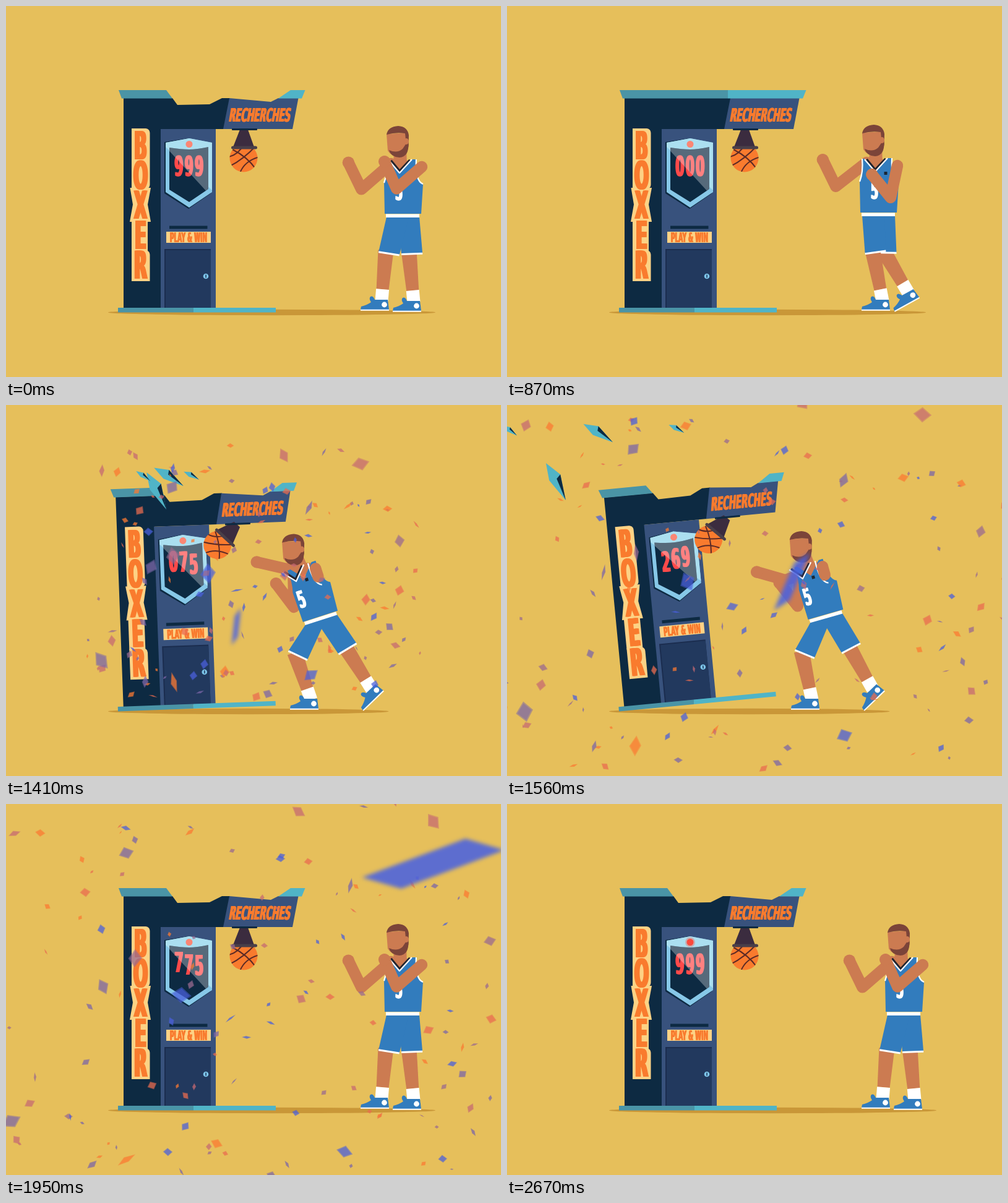
Animation of 800 by 600 pixels, one loop 2.7 s. Source, as an HTML page with a canvas:

```html
<!DOCTYPE html>
<html lang="en">
<head>
<meta charset="utf-8">
<title>Boxing machine</title>
<style>
  html, body { margin: 0; overflow: hidden; background: #e6bf5b; }
  canvas { display: block; }
</style>
</head>
<body>
<canvas id="stage" width="800" height="600"></canvas>
<script>
const ctx = document.getElementById('stage').getContext('2d');
const LOOP = 2700, HIT = 1350, COUNT_START = 1353.5, COUNT_END = 2123.5;
const SKY = '#e6bf5b', NAVY = '#0d2a42', ORANGE = '#f97b2e', CREAM = '#fdd285';
const TEAL = '#4a94a6', AQUA = '#50b4c7', PANEL = '#38527d', DOOR = '#22395e';
const SKIN = '#cc7b51', HAIR = '#7b4439', BLUE = '#327cbd', WHITE = '#fff';
const CONDENSED = .44, GROUND = 494;
const RAD = Math.PI / 180;

const clamp = v => Math.max(0, Math.min(1, v));
const span = (t, a, b) => clamp((t - a) / (b - a));
const lerp = (a, b, k) => a + (b - a) * k;
const smooth = k => k * k * (3 - 2 * k);
const arc = (t, a, b) => Math.sin(Math.PI * span(t, a, b));
const mix = (a, b, k) => a.map((v, i) => lerp(v, b[i], k));
const random = n => { const v = Math.sin(n * 127.1 + 11.7) * 43758.5453; return v - Math.floor(v); };

function turn([x, y], deg, px, py) {
  const c = Math.cos(deg * RAD), s = Math.sin(deg * RAD);
  return [x + px * c - py * s, y + px * s + py * c];
}
function poly(color, pts) {
  ctx.beginPath();
  for (let i = 0; i < pts.length; i += 2) ctx.lineTo(pts[i], pts[i + 1]);
  ctx.fillStyle = color;
  ctx.fill();
}
function rect(color, x, y, w, h, r = 0) {
  ctx.beginPath();
  ctx.roundRect(x, y, w, h, r);
  ctx.fillStyle = color;
  ctx.fill();
}
function disc(color, x, y, rx, ry = rx) {
  ctx.beginPath();
  ctx.ellipse(x, y, rx, ry, 0, 0, 7);
  ctx.fillStyle = color;
  ctx.fill();
}
function shape(color, d) {
  ctx.fillStyle = color;
  ctx.fill(new Path2D(d));
}
function line(color, width, d) {
  ctx.strokeStyle = color;
  ctx.lineWidth = width;
  ctx.stroke(new Path2D(d));
}
function placed([x, y], deg, draw) {
  ctx.save();
  ctx.translate(x, y);
  ctx.rotate(deg * RAD);
  draw();
  ctx.restore();
}
// Centred condensed lettering, thickened sideways; cap is the capital height.
function label(text, x, y, cap, color, slant = 0) {
  ctx.save();
  ctx.transform(CONDENSED, 0, -slant, 1, x, y);
  ctx.font = `bold ${cap / .729}px "DejaVu Sans", sans-serif`;
  ctx.textAlign = 'center';
  ctx.fillStyle = color;
  for (const shift of [-1, 0, 1]) ctx.fillText(text, shift * cap * .085, 0);
  ctx.restore();
}

// ---- Machine ----
function ball(swing) {
  placed([384, 200], swing, () => {
    disc(ORANGE, 0, 46, 22.5);
    ctx.save();
    ctx.beginPath();
    ctx.arc(0, 46, 22.5, 0, 7);
    ctx.clip();
    line('#5c2b26', 2, 'M-24 60 Q0 48 20 26 M-18 32 Q6 44 20 64 M-24 44 Q-8 40 0 24 M-6 70 Q2 50 26 44');
    ctx.restore();
    poly('#3b2c3f', [-6, 0, 7, 0, 17, 28, -17, 28]);
    rect('#493f49', -20, 26.5, 42, 5, 2.5);
  });
  rect(NAVY, 365, 198, 41, 3, 1);
}

function screen(t) {
  shape(NAVY, 'M256 220 L294 214 L333 221 L331 303 L295 328 L256 303 Z');
  shape('#87c8e8', 'M258 221 L296 214 L333 221 V301 L296 326 L258 301 Z');
  shape('#abdff0', 'M258 221 L296 214 L333 221 V298 L258 228 Z');
  const glass = new Path2D('M264 229 Q284 232 296 232 Q308 232 327 228 V296 L296 317 L264 297 Z');
  ctx.fillStyle = NAVY;
  ctx.fill(glass);

  const lit = t > COUNT_END && (t - 2240 + LOOP) % 195 < 100;
  if (lit) disc('rgba(255,80,60,.35)', 296, 223.5, 8);
  disc(lit ? '#fb4a3c' : '#fa8674', 296, 223.5, 5.5);

  const counting = t > COUNT_START && t < COUNT_END;
  const score = 999 * (t < HIT ? 1 - span(t, 60, 480) : span(t, COUNT_START, COUNT_END));
  [...String(Math.round(score)).padStart(3, '0')].forEach((digit, i) => {
    const jolt = counting ? 3 * Math.sin(t / 40 + i * 2) : 0;
    label(digit, 279.5 + i * 16.3, 275 + jolt, 33, '#ff4a4a');
  });
  ctx.save();
  ctx.clip(glass);
  shape('rgba(255,255,255,.3)', 'M258 228 V210 H340 V317 Z');
  ctx.restore();
}

function sign() {
  rect(CREAM, 203, 198, 29.5, 98, [0, 7, 7, 0]);
  shape(CREAM, 'M200.5 294 H234 L229 321 L234 349 H200 L205 321 Z');
  rect(CREAM, 203, 347, 26, 50);
  rect(CREAM, 203, 395, 29.5, 50, [0, 7, 0, 0]);
  [...'BOXER'].forEach((letter, i) => label(letter, 217.5, 248 + i * 48.2, 45, ORANGE));
}

function machine(t) {
  const dent = t < HIT ? 1 - smooth(span(t, 100, 460)) : span(t, HIT, HIT + 60);
  const d = (whole, bent) => lerp(whole, bent, dent);
  const tilt = -5.65 * arc(t, HIT, HIT + 500);
  const swing = Math.min(45, 95 * arc(t, HIT - 20, HIT + 470));

  placed([182, 495], tilt, () => {
    ctx.translate(-182, -495);
    shape(NAVY, `M190 149 H269 L277 ${d(149, 160)} L329 ${d(149, 159)} L349 149 H362 L352 199 H251 V489 H190 Z`);
    rect(PANEL, 250, 199, 89, 290);
    shape(PANEL, `M361 149 L428 ${d(149, 155)} L440 149 H472.5 L463 199 H351 Z`);
    shape(TEAL, `M182 136 H${d(357, 259)} L${d(357, 269)} 149.5 H187 Z`);
    shape(AQUA, `M${d(357, 460)} 136 H483.5 L478 149.5 H${d(357, 440)} Z`);
    label('RECHERCHES', 409, 187, 22, ORANGE, .17);
    sign();
    screen(t);

    rect(NAVY, 264, 355.5, 61.5, 5);
    rect(CREAM, 259, 365, 72, 18);
    label('PLAY & WIN', 295, 381.5, 15, ORANGE);
    rect('#1b2d4f', 256, 393, 75, 95);
    rect(DOOR, 258, 395, 73, 93);
    disc('#7cc4e8', 323, 437, 4.3);
    rect(DOOR, 322.3, 434.5, 1.6, 5);
    rect(TEAL, 181, 488, 122, 7.5);
    rect(AQUA, 303, 488, 133, 7.5);
    ball(swing);
  });
}

// ---- Player ----
// chest: lean, twist; arms: upper angle, forearm angle, upper length; feet: front heel, rear toe, rear lift
const GUARD = { waist: [641, 338], chest: [0, 0], far: [139, 244, 63], near: [139, 246, 54], feet: [619, 625, 0] };
const STEP = { waist: [600, 336], chest: [0, 0], far: [142, 244, 63], near: [102, 231, 53], feet: [619, 627, 29] };
const WINDUP = { waist: [556, 350], chest: [12, 0], far: [176, 198, 58], near: [-6, 216, 36], feet: [508, 523, 0] };
const PUNCH = { waist: [508, 344], chest: [-18, -14], far: [89, 233, 56], near: [180, 193, 48], feet: [505, 578, 44] };
const FOLLOW = { waist: [515, 341], chest: [-16, -14], far: [94, 232, 59], near: [160, 196, 64], feet: [505, 578, 44] };
const TIMELINE = [[0, GUARD], [540, GUARD], [870, STEP], [1170, WINDUP], [1240, WINDUP], [HIT, PUNCH],
  [1400, PUNCH], [1560, FOLLOW], [1590, FOLLOW], [1955, GUARD], [LOOP, GUARD]];

function poseAt(t) {
  const i = TIMELINE.findIndex(key => key[0] > t);
  const [from, a] = TIMELINE[i - 1], [to, b] = TIMELINE[i];
  const k = span(t, from, to), eased = to === HIT ? k * k : smooth(k);
  const pose = {};
  for (const part in a) pose[part] = mix(a[part], b[part], eased);
  pose.waist[1] += 4 * arc(t, 0, 540) ** 2;
  return pose;
}

function limb(...joints) {
  ctx.lineCap = ctx.lineJoin = 'round';
  line(SKIN, 18.5, 'M' + joints.join('L'));
  ctx.lineCap = 'butt';
}
function arm(shoulder, [upper, fore, length]) {
  const elbow = turn(shoulder, upper, length, 0);
  const fist = turn(elbow, fore, 48, 0);
  limb(shoulder, elbow, fist);
  disc(SKIN, ...fist, 9.7);
}
function taper(color, [ax, ay], [bx, by], wa, wb) {
  const len = Math.hypot(bx - ax, by - ay) || 1;
  const nx = (ay - by) / len, ny = (bx - ax) / len;
  poly(color, [ax + nx * wa, ay + ny * wa, bx + nx * wb, by + ny * wb,
    bx - nx * wb, by - ny * wb, ax - nx * wa, ay - ny * wa]);
}

// Two-bone joint that bends towards the machine.
function kneeBetween(hip, ankle, thigh = 59, shin = 75) {
  const dx = ankle[0] - hip[0], dy = ankle[1] - hip[1];
  const reach = Math.min(Math.hypot(dx, dy), thigh + shin);
  const along = (thigh ** 2 - shin ** 2 + reach ** 2) / (2 * reach);
  const bend = Math.sqrt(Math.max(0, thigh ** 2 - along ** 2));
  return turn(hip, Math.atan2(dy, dx) / RAD, along, bend);
}

function leg(hip, heel, angle, inner, outer) {
  const collar = turn(heel, angle, -12, -16);
  const knee = kneeBetween(hip, collar);
  const start = [knee[0] - 5, knee[1] - 5];
  const sock = mix(collar, start, 19 / Math.hypot(collar[0] - start[0], collar[1] - start[1]));
  taper(SKIN, start, sock, 12.5, 10);
  taper(WHITE, sock, collar, 10.5, 10.5);
  placed(heel, angle, () => {
    shape(BLUE, 'M-46 -2 L-45 -7 Q-36 -9 -29 -14 Q-33 -20 -30 -23 Q-26 -25 -23 -18 L-2 -18 L0 -2 Z');
    rect(WHITE, -46, -2.2, 46, 2);
    disc(WHITE, -7.5, -10, 4.4);
  });

  const across = Math.atan2(knee[1] - hip[1], knee[0] - hip[0]) / RAD - 90;
  const left = turn(knee, across, -17, 0), right = turn(knee, across, 17, 0);
  poly(BLUE, [...inner, ...outer, ...right, ...left]);
  line(WHITE, 3, `M${left}L${right}`);
}

function head(at, tilt) {
  placed(at, tilt, () => {
    shape(SKIN, 'M-17 -13 L16 -15 L18 5 Q17 23 4 24 Q-9 24 -15 14 Z');
    shape(HAIR, 'M-17 -12 Q-15 -25 2 -26 Q17 -25 19 -11 L18.5 8 L14 -4 L13 -14 Q-2 -16 -17 -12 Z');
    shape(HAIR, 'M-13 13 Q0 19 9 11 L15 2 L18.5 3 Q19 24 4 25 Q-10 24 -13 13 Z');
    disc(SKIN, 15, -1, 4, 5);
  });
}

function jersey(waist, [lean, twist]) {
  placed(waist, lean, () => {
    const cloth = new Path2D('M-27 -89 L-22 -89 L-5 -69 L14 -90 L21 -90 Q20 -55 33 -50 L30 -2 L-29 -2 L-30 -52 Q-25 -68 -27 -89 Z');
    ctx.fillStyle = BLUE;
    ctx.fill(cloth);
    rect(WHITE, -27, -1.5, 54, 5.5);
    shape(SKIN, 'M-20 -88 L-5 -71 L12 -88 Z');
    ctx.translate(twist, 0);
    line('#22242e', 4, 'M-19 -88 L-5 -71 L12 -89');
    line(WHITE, 2.2, 'M-22 -88 L-5 -68 L15 -90 M22 -90 Q20 -55 33 -50');
    if (twist > -7) line(WHITE, 2.2, 'M-26 -89 Q-24 -68 -30 -52');
    rect('#1b2633', 9.5, -68, 5, 5);
    label('5', -6, -24, 28, WHITE);
  });
}

function player(t, { waist, chest, far, near, feet: [front, toe, lift] }) {
  const [lean, twist] = chest;
  const on = (x, y) => turn(waist, lean, x, y);
  const shoulder = on(31 + twist, -78);
  const punching = t > 1300 && t < 1720;

  arm(on(-19, -83), far);
  if (punching) arm(shoulder, near);
  leg(on(13, 4), turn([toe, GROUND + 1], -lift, 46, 0), -lift, on(-8, 3), on(27, 3));
  leg(on(-13, 4), [front, GROUND - 1], 0, on(-26, 3), on(10, 3));
  const skull = on(-9, -118), tilt = Math.max(0, lean) * .6;
  taper(SKIN, turn(skull, tilt, 5, 8), on(-4, -78), 10, 11);
  jersey(waist, chest);
  head(skull, tilt);
  if (punching) limb(shoulder, on(31 + twist, -64));
  else arm(shoulder, near);
}

// ---- Debris ----
const SHARDS = [[80, 124, 62, 34], [148, 46, 32, 28], [274, 39, 28, 14], [6, 42, 35, 14]];
const CONFETTI = ['#fb7a32', '#e96c50', '#c56a72', '#9a6a90', '#7b66a8', '#4a60dc'];

function shards(t) {
  const k = (t - HIT) / 210;
  if (k <= 0 || k > 2.2) return;
  for (const [x, y, angle, size] of SHARDS) {
    placed([lerp(310, x, k), lerp(145, y, k)], angle, () => {
      poly(AQUA, [-size, 0, size * -.2, size * -.35, size, 0, size * -.2, size * .25]);
      poly(NAVY, [size * -.2, size * -.35, size, 0, size * -.1, size * -.1]);
    });
  }
}

function confetti(t) {
  const age = t - HIT;
  if (age < 0) return;
  const burst = 1 - Math.exp(-age / 60);
  for (let i = 0; i < 135; i++) {
    const r = n => random(i * 9 + n);
    const fade = 1 - span(t, 2180 + r(1) * 300, 2330 + r(1) * 310);
    if (!fade) continue;
    const x = lerp(390, r(2) * 860 - 30, burst) + (r(3) - .5) * age * .06;
    const y = lerp(260, r(4) * 640 - 50, burst) + age * (.02 + r(5) * .05);
    const size = (2.5 + 5 * r(6) + 12 * r(7) ** 9) * fade;
    const flat = .15 + .7 * Math.abs(Math.cos(r(8) * 6 + age / 170));
    placed([x, y], r(3) * 360 + age * (r(6) - .5) * .4, () => {
      const color = CONFETTI[Math.floor(r(0) * CONFETTI.length)];
      for (const s of [size * 1.1, size * .9]) {
        ctx.globalAlpha = .5;
        poly(color, [-s, 0, s * -.1, -s * flat, s, s * -.1, s * .1, s * flat]);
      }
    });
  }
}

// One large blue piece tumbling towards the viewer.
function flyer(t) {
  if (t < 1400 || t > 2200) return;
  const k = (t - 1560) / 390;
  placed([lerp(460, 690, k), lerp(286, 97, k)], lerp(-58, -11, k), () => {
    const w = lerp(55, 117, k), h = lerp(13, 30, k);
    ctx.filter = 'blur(3px)';
    ctx.globalAlpha = .88;
    poly('#4a62e0', [-w, 0, w * .5, -h, w, 0, w * -.5, h]);
  });
}

function draw() {
  const t = performance.now() % LOOP;
  const pose = poseAt(t), [, toe, lift] = pose.feet;
  const shade = Math.max(614, toe + 69 - lift * .65);
  rect(SKY, 0, 0, 800, 600);
  disc('#c99738', (165 + shade) / 2, 495.5, (shade - 165) / 2, 4.7);
  machine(t);
  player(t, pose);
  shards(t);
  confetti(t);
  flyer(t);
  requestAnimationFrame(draw);
}
draw();
</script>
</body>
</html>
```
